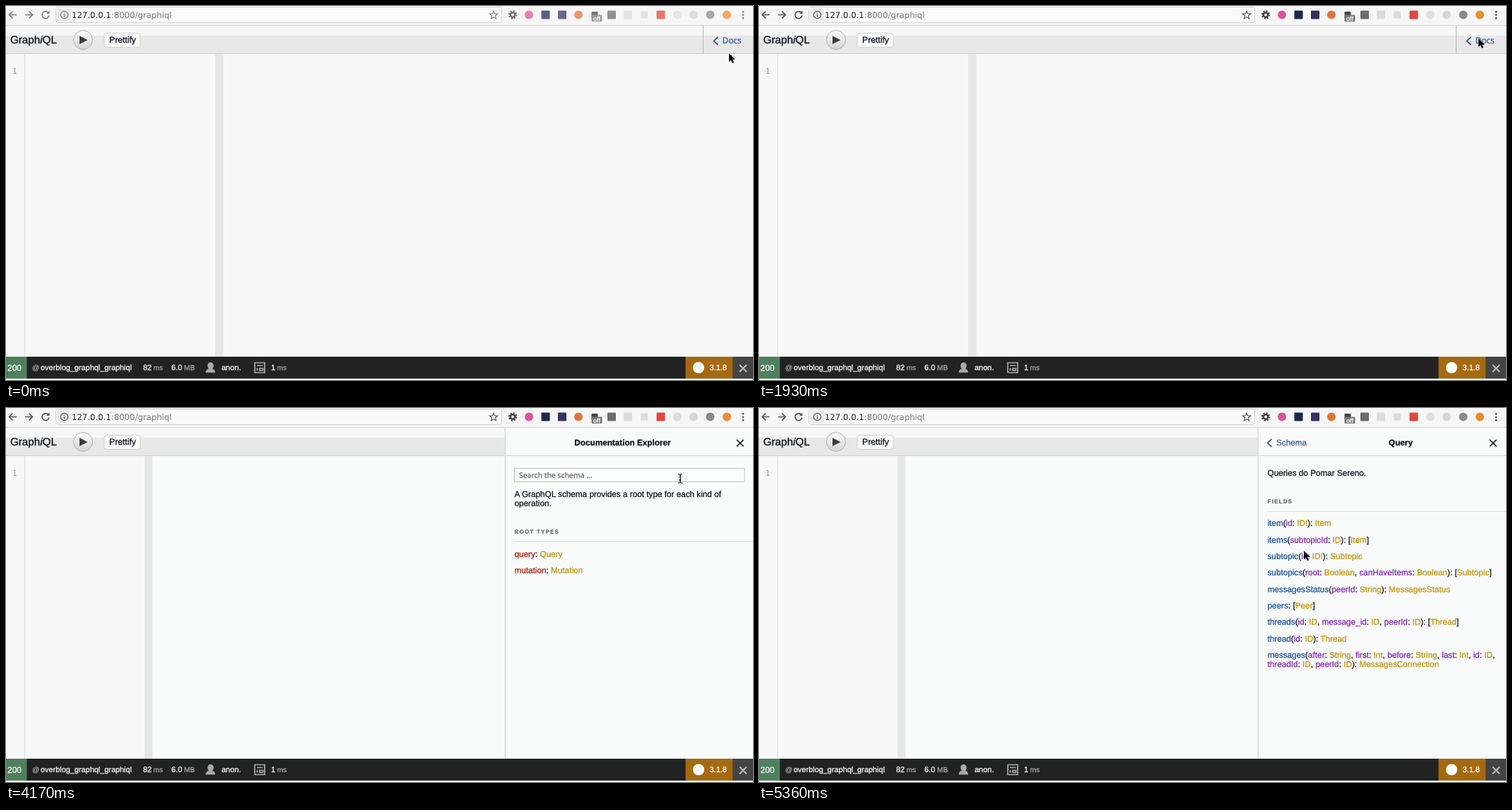
Animation of 1057 by 530 pixels, one loop 8 s. Source, as an HTML page:

```html
<!DOCTYPE html>
<html lang="en">
<head>
<meta charset="utf-8">
<title>GraphiQL docs explorer</title>
<style>
html, body { margin: 0; width: 100%; height: 100%; overflow: hidden; background: #f8f8f8; }
svg { display: block; width: 1057px; height: 530px; }
text, tspan { fill: currentColor; stroke: currentColor; stroke-width: .25px; }
text { font-family: "Liberation Sans", Arial, sans-serif; font-size: 11.74px; color: #0c0f18; white-space: pre; text-rendering: geometricPrecision; }
.url { font-family: "DejaVu Sans", sans-serif; font-size: 11.7px; color: #777; }
.url, .url tspan { stroke: none; }
.ui { font-family: "Noto Sans", sans-serif; }
.link { color: #3b5998; }
.bold { font-weight: bold; }
.head { font-weight: bold; font-size: 8px; letter-spacing: 1.2px; color: #666; }
.hint { font-size: 10.45px; color: #666; }
.bar text { font-size: 11px; color: #fff; }
.bar .dim { font-size: 10.2px; color: #aaa; }
.line { fill: none; stroke-width: 1.7; }
</style>
</head>
<body>
<svg viewBox="0 0 1057 530" xmlns="http://www.w3.org/2000/svg">
  <defs>
    <linearGradient id="knob" x2="0" y2="1">
      <stop stop-color="#fdfdfd"/><stop offset="1" stop-color="#d2d3d6"/>
    </linearGradient>
  </defs>
  <rect width="1057" height="530" fill="#f8f8f8"/>

  <!-- browser toolbar -->
  <rect width="1057" height="27" fill="#f6f6f6"/>
  <rect x="70.5" y="1.5" width="631" height="22" rx="3" fill="#fafafa" stroke="#d2d2d2"/>
  <rect x="72" y="3" width="20" height="19" rx="2" fill="#ebebeb"/>
  <rect y="27" width="1057" height="1" fill="#d6d6d6"/>
  <text class="url" x="93" y="17"><tspan color="#222">127.0.0.1</tspan>:8000/graphiql</text>
  <g id="tools">
    <g class="line" stroke="#555" stroke-width="1.4">
      <path d="M15 12.5H5M9.5 7.5L4.5 12.5L9.5 17.5M27 12.5H37M32.5 7.5L37.5 12.5L32.5 17.5"/>
      <path d="M60 9.5A5 5 0 1 0 61 13.5"/>
      <circle cx="82.5" cy="12.5" r="5.2" style="stroke-width:1.2"/>
      <path d="M82.5 11.8V15.5M82.5 9.3V10.6" style="stroke-width:1.3"/>
      <path id="star" style="stroke-width:1.2"/>
    </g>
    <path d="M61.5 6.5V11H57Z" fill="#555"/>
    <g fill="none" stroke="#444">
      <circle cx="717" cy="12.5" r="3.3" stroke-width="2.6"/>
      <circle cx="717" cy="12.5" r="5.2" stroke-width="2" stroke-dasharray="2.04 2.04"/>
    </g>
    <g id="badges"></g>
    <rect x="828.5" y="12.5" width="15" height="9.5" rx="1.5" fill="#777"/>
    <text x="836" y="20.5" text-anchor="middle" style="font-size:9px;color:#fff">off</text>
    <g fill="#555">
      <circle cx="1043" cy="8.3" r="1.4"/><circle cx="1043" cy="12.8" r="1.4"/><circle cx="1043" cy="17.3" r="1.4"/>
    </g>
  </g>

  <!-- page header -->
  <rect y="28" width="1057" height="14" fill="#f7f7f7"/>
  <rect y="42" width="1057" height="25" fill="#e8e8e8"/>
  <rect y="67" width="1057" height="1" fill="#d0d0d0"/>
  <text x="6" y="53" style="font-size:15.2px">Graph<tspan font-style="italic">i</tspan>QL</text>
  <circle cx="109" cy="48" r="13.5" fill="url(#knob)" stroke="#b0b0b0"/>
  <path d="M104 42.3V54L115.5 48.2Z" fill="#3c3c3c"/>
  <rect x="139" y="38.5" width="51" height="20" rx="3" fill="#f9f9f9" stroke="#cfcfcf"/>
  <text x="146" y="52" style="font-size:12.2px">Prettify</text>

  <!-- editor -->
  <rect y="68" width="26" height="430" fill="#f7f7f7"/>
  <rect x="26" y="68" width="1" height="430" fill="#dcdcdc"/>
  <text x="9" y="95.5" style="font:11px 'DejaVu Sans Mono',monospace;color:#999;stroke:none">1</text>
  <rect id="result" y="68" height="430" fill="#f9fbfb"/>
  <rect id="split" y="68" width="11.5" height="430" fill="#e7e7e7"/>

  <g id="docs">
    <rect x="986" y="28" width="1" height="39" fill="#b5b5b5"/>
    <path class="line" stroke="#3b5998" d="M1007.5 44L1001.5 49.5L1007.5 55"/>
    <text class="ui link" x="1013.5" y="53" style="font-size:11.9px">Docs</text>
  </g>

  <g id="panel">
    <rect x="706" y="28" width="351" height="470" fill="#f9fbfb"/>
    <rect x="705.5" y="28" width="1.5" height="470" fill="#dadada"/>
    <rect x="707" y="67" width="350" height="1" fill="#d4d6d6"/>
    <path class="line" stroke="#111" d="M1034 45L1043.5 54.5M1043.5 45L1034 54.5"/>
    <g id="root">
      <text class="bold" x="872.5" y="53" text-anchor="middle">Documentation Explorer</text>
      <rect x="719.5" y="85.5" width="325.5" height="19" fill="#fbfcfc" stroke="#c2c2c2"/>
      <text class="ui hint" x="726" y="98.5">Search the schema ...</text>
      <text x="719.5" y="126">A GraphQL schema provides a root type for each kind of</text>
      <text x="719.5" y="139">operation.</text>
      <text class="head" x="719.5" y="178">ROOT TYPES</text>
      <rect x="719.5" y="189" width="338" height="1" fill="#dedede"/>
    </g>
    <g id="query">
      <path class="line" stroke="#3b5998" d="M725.5 44L719.5 49.5L725.5 55"/>
      <text class="link" x="732" y="53">Schema</text>
      <text class="bold" x="908" y="53" text-anchor="middle">Query</text>
      <text x="719.5" y="95.5">Queries do Pomar Sereno.</text>
      <text class="head" x="719.5" y="135">FIELDS</text>
      <rect x="719.5" y="146" width="338" height="1" fill="#dedede"/>
    </g>
  </g>

  <!-- debug bar -->
  <g class="bar">
    <rect y="497" width="1057" height="31" fill="#222"/>
    <rect y="497" width="29.5" height="31" fill="#4f805d"/>
    <text x="2" y="517" style="font-size:12px">200</text>
    <text class="dim" x="37" y="516">@</text>
    <text x="49" y="516" style="font-size:10.9px">overblog_graphql_graphiql</text>
    <text x="194" y="516">82</text><text class="dim" x="208.5" y="516">ms</text>
    <text x="234" y="516">6.0</text><text class="dim" x="252" y="516">MB</text>
    <path d="M282.5 519.5Q282.5 515 287 514.3Q285 512 285.2 509Q286 505 289.5 505Q293 505 293.8 509Q294 512 292 514.3Q296 515 296 519.5Z" fill="#aaa"/>
    <text x="305" y="516">anon.</text>
    <path class="line" stroke="#aaa" d="M352 505.5H366V519.5H352ZM355 509.5H363.5M355.5 513V517M359 513.5H363.5V516.5H359Z"/>
    <text x="375" y="516">1</text><text class="dim" x="383.5" y="516">ms</text>
    <rect x="961.5" y="497" width="67" height="31" fill="#a46a12"/>
    <circle cx="980" cy="512.5" r="8" fill="#fff"/>
    <text x="995.5" y="516">3.1.8</text>
    <rect x="1028.5" y="497" width="29" height="31" fill="#444"/>
    <path d="M1038 508.5L1048 518.5M1048 508.5L1038 518.5" stroke="#bbb" stroke-width="2"/>
  </g>

  <g id="cursor">
    <path id="arrow" d="M0 0V12L2.8 9.5L4.8 14L7 13L5.1 8.7H9Z" fill="#000" stroke="#fff" paint-order="stroke"/>
    <path id="hand" d="M3.9 9.5V2a1.3 1.3 0 0 1 2.6 0V6.6q1.2-.8 2.2.3q1.2-.6 2 .5q1.8-.2 1.8 1.6V12q0 2-1.3 4H5.2Q4 13.5 1 10.6Q.4 9 1.8 9Q3 9 3.9 10.2Z" fill="#fff" stroke="#000"/>
    <g id="beam" fill="none">
      <path d="M-3 -6.5Q0 -6.5 0 -4.5V4.5Q0 6.5 -3 6.5M3 -6.5Q0 -6.5 0 -4.5V4.5Q0 6.5 3 6.5M-1.5 2H1.5" stroke="#fff" stroke-width="2.4"/>
      <path d="M-3 -6.5Q0 -6.5 0 -4.5V4.5Q0 6.5 -3 6.5M3 -6.5Q0 -6.5 0 -4.5V4.5Q0 6.5 3 6.5M-1.5 2H1.5" stroke="#111"/>
    </g>
  </g>
</svg>
<script>
const LOOP = 8000;
const FOCUS = 1930, OPEN = 3120, HOVER = 4910, DETAIL = 5360;
const $ = id => document.getElementById(id);

function add(parent, tag, attrs, content) {
  const el = document.createElementNS("http://www.w3.org/2000/svg", tag);
  for (const k in attrs) el.setAttribute(k, attrs[k]);
  if (content) el.textContent = content;
  parent.appendChild(el);
  return el;
}

const RED = "#a81604", BLUE = "#174f98", PURPLE = "#8220b0", GOLD = "#c29000";

// Colours a schema line: leading name, argument names, then types.
function row(parent, y, line, lead) {
  const text = add(parent, "text", { x: 719.5, y });
  const parts = line.split(/(\w+!?)/);
  let first = lead;
  return parts.map((part, i) => {
    if (!part) return null;
    if (i % 2 === 0) return add(text, "tspan", {}, part);
    const color = first || (parts[i + 1].startsWith(":") ? PURPLE : GOLD);
    first = null;
    return add(text, "tspan", { color }, part);
  });
}

const queryLink = row($("root"), 211, "query: Query", RED)[3];
row($("root"), 234, "mutation: Mutation", RED);

[
  "item(id: ID!): Item",
  "items(subtopicId: ID): [Item]",
  "subtopic(id: ID!): Subtopic",
  "subtopics(root: Boolean, canHaveItems: Boolean): [Subtopic]",
  "messagesStatus(peerId: String): MessagesStatus",
  "peers: [Peer]",
  "threads(id: ID, message_id: ID, peerId: ID): [Thread]",
  "thread(id: ID): Thread",
  "messages(after: String, first: Int, before: String, last: Int, id: ID,"
].forEach((line, i) => row($("query"), 167.2 + i * 23.33, line, BLUE));
row($("query"), 367, "threadId: ID, peerId: ID): MessagesConnection");

// Toolbar extension badges: x, colour, shape, size
[
  [740, "#d9559b", "o"], [763.5, "#1d2748", "s"], [787, "#37315f", "s"],
  [810, "#e0753c", "o"], [833, "#444", "s", 9], [857, "#6d6d6d", "s"],
  [880, "#dcdcdc", "s"], [903, "#dcdcdc", "s", 10], [926.5, "#e2483a", "s"],
  [950, "#dedede", "o"], [973, "#d6d6d6", "o"], [996.5, "#8a8a8a", "o"],
  [1020, "#f08a2c", "o"]
].forEach(([x, fill, shape, size = 12]) => {
  if (shape === "o") add($("badges"), "circle", { cx: x, cy: 12.5, r: 6, fill });
  else add($("badges"), "rect", { x: x - size / 2, y: 12.5 - size / 2, width: size, height: size, rx: 1, fill });
});

const star = Array.from({ length: 10 }, (_, i) => {
  const a = i * Math.PI / 5 - Math.PI / 2, r = i % 2 ? 2.6 : 6;
  return (690 + r * Math.cos(a)).toFixed(1) + " " + (13 + r * Math.sin(a)).toFixed(1);
});
$("star").setAttribute("d", "M" + star.join("L") + "Z");

// Pointer stops: time, x, y, shape
const stops = [
  [0, 1023, 67], [150, 1023, 58], [300, 1022, 55], [900, 1000, 42],
  [1050, 983, 37], [1190, 985, 72], [1340, 1011, 68], [1490, 1017, 47],
  [1640, 1018, 46], [2680, 1015, 54.5, "hand"], [2970, 1018, 55],
  [4170, 954, 100, "beam"], [4320, 853, 169], [4470, 795, 186],
  [4620, 781, 186], [4760, 770, 201], [4910, 768, 202, "hand"], [5210, 771, 202.5]
];

function show(id, on) { $(id).style.display = on ? "" : "none"; }

function update(t) {
  const open = t >= OPEN, detail = t >= DETAIL;
  const splitX = open ? 196 : 296;
  $("tools").style.opacity = t < FOCUS ? 0.72 : 1;
  $("split").setAttribute("x", splitX);
  $("result").setAttribute("x", splitX);
  $("result").setAttribute("width", open ? 706 - splitX : 0);
  show("docs", !open);
  show("panel", open);
  show("root", !detail);
  show("query", detail);
  queryLink.setAttribute("text-decoration", t >= HOVER ? "underline" : "none");

  const [, x, y, shape = "arrow"] = stops.filter(s => s[0] <= t).pop();
  $("cursor").setAttribute("transform", `translate(${x} ${y})`);
  for (const id of ["arrow", "hand", "beam"]) show(id, id === shape);
}

const start = performance.now();
function tick() {
  update((performance.now() - start) % LOOP);
  requestAnimationFrame(tick);
}
tick();
</script>
</body>
</html>
```
